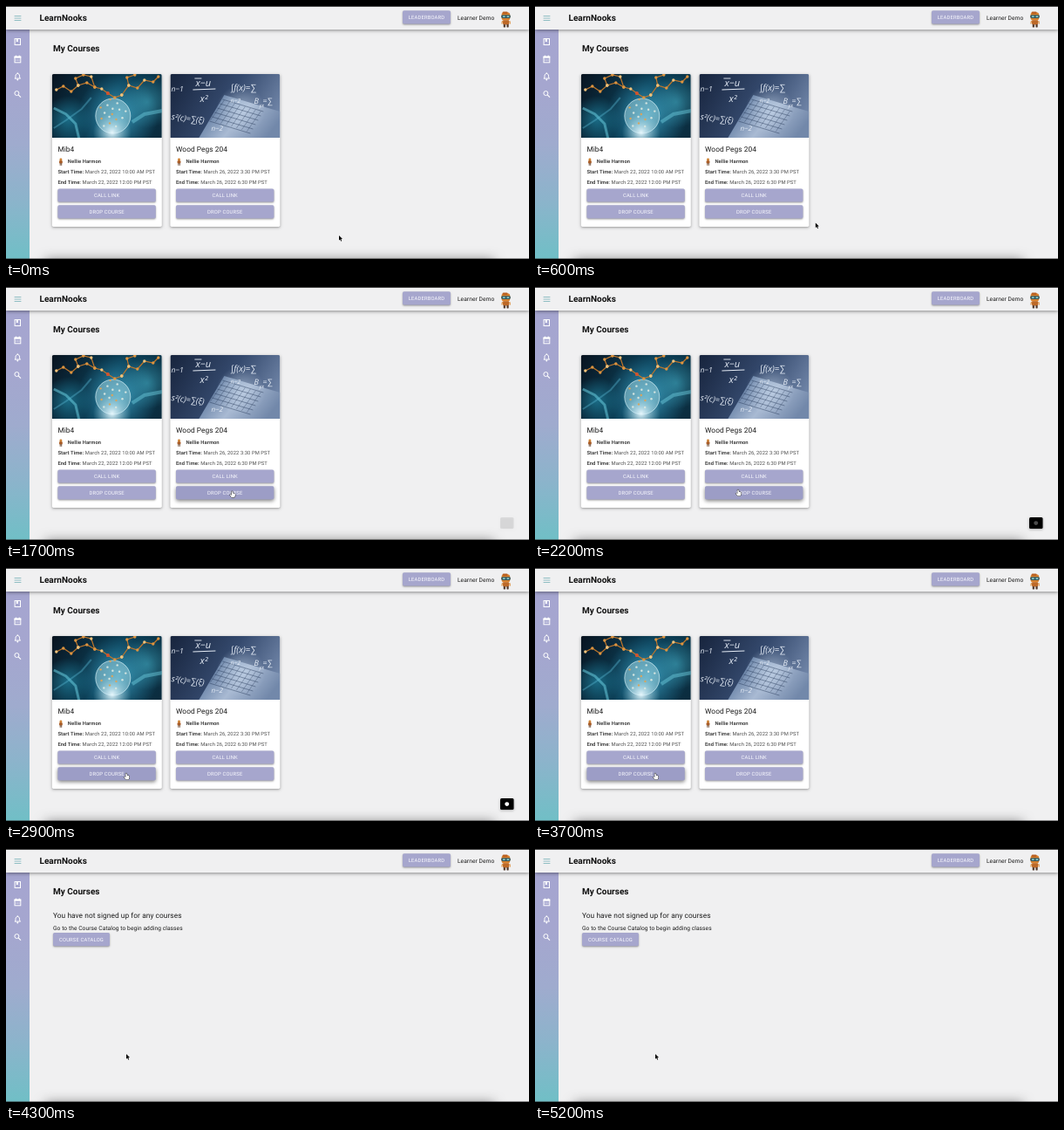
An HTML page with a canvas for the animation above (6800 ms loop, 600x290 px).

```html
<!DOCTYPE html>
<html lang="en">
<head>
<meta charset="utf-8">
<title>My Courses</title>
<style>
html, body { margin: 0; width: 100%; height: 100%; overflow: hidden; background: #f0f0f1; }
canvas { display: block; width: 600px; height: 290px; }
</style>
</head>
<body>
<canvas id="stage" width="600" height="290"></canvas>
<script>
const ctx = document.getElementById('stage').getContext('2d');
const LOOP = 6800;
const DROP_SECOND = 3800, DROP_FIRST = 4200;
const LILAC = '#a6a6cd';

const clamp = v => Math.max(0, Math.min(1, v));
const ease = v => { v = clamp(v); return v * v * (3 - 2 * v); };
const ramp = (t, from, to) => ease((t - from) / (to - from));

// time, x, y of the pointer tip
const track = [
  [200, 382, 263], [1000, 262, 234], [1600, 262, 234],
  [2150, 233, 232], [2350, 233, 232], [2800, 138, 235]
];

function pointerAt(t) {
  let a = track[0];
  for (const b of track) {
    if (t < b[0]) {
      const k = ramp(t, a[0], b[0]);
      return [a[1] + (b[1] - a[1]) * k, a[2] + (b[2] - a[2]) * k];
    }
    a = b;
  }
  return [a[1], a[2]];
}

// Time at which the pointer enters or leaves each drop button
function findCrossing(test) {
  let t = 0;
  while (t < 3000 && !test(...pointerAt(t))) t += 10;
  return t;
}
const enterSecond = findCrossing((x, y) => x < 308 && y > 228 && y < 243);
const leaveSecond = findCrossing(x => x < 195);
const enterFirst = findCrossing(x => x < 172);

function text(str, x, y, size, opt = {}) {
  ctx.font = `${opt.style || ''} ${opt.weight || 400} ${size}px ${opt.font || 'Roboto, sans-serif'}`;
  ctx.letterSpacing = (opt.gap || 0) * size + 'px';
  ctx.textRendering = 'geometricPrecision';
  ctx.textAlign = opt.align || 'left';
  ctx.fillStyle = opt.color || '#1c1c1c';
  ctx.fillText(str, x, y);
  const w = ctx.measureText(str).width;
  ctx.letterSpacing = '0px';
  return w;
}

function box(x, y, w, h, r, fill) {
  ctx.beginPath();
  ctx.roundRect(x, y, w, h, r);
  ctx.fillStyle = fill;
  ctx.fill();
}

function dot(x, y, r, fill) {
  ctx.beginPath();
  ctx.arc(x, y, r, 0, 7);
  ctx.fillStyle = fill;
  ctx.fill();
}

function line(points, color, width) {
  ctx.beginPath();
  points.forEach(([x, y]) => ctx.lineTo(x, y));
  ctx.strokeStyle = color;
  ctx.lineWidth = width;
  ctx.stroke();
}

function shadow(blur, dy, alpha, draw) {
  ctx.save();
  ctx.shadowColor = `rgba(0,0,0,${alpha})`;
  ctx.shadowBlur = blur;
  ctx.shadowOffsetY = dy;
  draw();
  ctx.restore();
}

function gradient(x0, y0, x1, y1, ...colors) {
  const g = ctx.createLinearGradient(x0, y0, x1, y1);
  colors.forEach((c, i) => g.addColorStop(i / (colors.length - 1), c));
  return g;
}

function glow(x, y, r, color, clear) {
  const g = ctx.createRadialGradient(x, y, 0, x, y, r);
  g.addColorStop(0, color);
  g.addColorStop(1, clear);
  ctx.fillStyle = g;
  ctx.fillRect(x - r, y - r, r * 2, r * 2);
}

function button(label, x, y, w, hover = 0) {
  shadow(2 + hover * 2.5, 1 + hover * 0.8, 0.38 + hover * 0.12, () =>
    box(x, y, w, 15.2, 1.7, hover ? `rgb(${166 - 10 * hover},${166 - 9 * hover},${205 - 7 * hover})` : LILAC));
  text(label, x + w / 2, y + 9.7, 5.83, { align: 'center', gap: 0.0286, color: '#fafaff' });
}

function sciencePhoto() {
  ctx.fillStyle = gradient(0, 0, 126, 73, '#08131f', '#0c4159', '#0b2b3d');
  ctx.fillRect(0, 0, 126, 73);
  glow(76, 46, 46, 'rgba(62,164,196,.95)', 'rgba(40,130,165,0)');
  glow(109, 32, 30, 'rgba(64,165,188,.6)', 'rgba(64,165,188,0)');
  glow(18, 52, 27, 'rgba(34,140,170,.65)', 'rgba(34,140,170,0)');
  line([[2, 39], [16, 46], [27, 57], [31, 74]], 'rgba(105,203,220,.55)', 3);
  line([[2, 62], [16, 53], [34, 40], [45, 27]], 'rgba(88,180,208,.4)', 2);
  line([[92, 55], [106, 46], [127, 42]], 'rgba(112,207,224,.45)', 4);
  dot(70, 48, 20, 'rgba(152,202,215,.55)');
  ctx.strokeStyle = 'rgba(210,238,245,.7)';
  ctx.lineWidth = 1;
  ctx.stroke();
  glow(69, 67, 22, 'rgba(235,250,255,.95)', 'rgba(150,210,230,0)');
  for (let i = 0; i < 16; i++) {
    const a = i * 2.4, r = 4.4 * Math.sqrt(i);
    dot(69 + r * Math.cos(a), 46 + r * Math.sin(a), 1.2, i % 3 ? '#d3e4df' : '#d6a55f');
  }
  const chains = [
    [[5, 18], [13, 14], [22, 20], [30, 13], [40, 10], [49, 15], [57, 17], [64, 22], [72, 27], [80, 24]],
    [[30, 13], [27, 5], [36, 1], [45, 3], [49, 15]],
    [[80, 24], [88, 13], [98, 16], [106, 7], [116, 9], [122, 3]],
    [[88, 13], [86, 4], [95, 1]]
  ];
  for (const c of chains) {
    line(c, '#bd752b', 1.2);
    c.forEach(([x, y], i) => dot(x, y, 1.7, i % 3 ? '#dc9440' : '#eec27c'));
  }
  dot(64, 22, 2, '#d4502c');
}

function mathPhoto() {
  ctx.fillStyle = gradient(0, 0, 126, 73, '#17243d', '#354a6e', '#8196b8');
  ctx.fillRect(0, 0, 126, 73);
  ctx.beginPath();
  [[62, 24], [126, 43], [126, 73], [33, 73]].forEach(p => ctx.lineTo(...p));
  ctx.fillStyle = gradient(50, 25, 110, 73, '#58749b', '#a9bad3', '#7288aa');
  ctx.fill();
  glow(81, 41, 28, 'rgba(195,212,232,.65)', 'rgba(195,212,232,0)');
  for (let i = 0; i < 6; i++) {
    line([[60 - i * 3, 29 + i * 5], [107 - i * 3, 43 + i * 5]], 'rgba(33,51,84,.55)', 0.8);
  }
  for (let i = 0; i < 8; i++) {
    line([[62 + i * 6, 30 + i * 1.8], [46 + i * 6, 53 + i * 1.8]], 'rgba(33,51,84,.4)', 0.8);
  }
  const ink = { font: '"Open Sans", sans-serif', style: 'italic', color: '#e6edf7' };
  text('n−1', 1, 20, 8.5, ink);
  text('x−u', 29, 14, 11, ink);
  line([[28, 5], [36, 5]], '#e6edf7', 0.9);
  line([[26, 18], [52, 17]], '#e6edf7', 1);
  text('x²', 34, 32, 11, ink);
  text('∫f(x)=∑', 69, 19, 10, ink);
  text('n−2', 69, 33, 7, ink);
  text('B  =∑', 96, 34, 9, ink);
  text('yx', 102, 38, 6, ink);
  ctx.save();
  ctx.translate(1, 52);
  ctx.rotate(0.12);
  text('s²(c)=∑(ξ)', 0, 0, 9.5, ink);
  ctx.restore();
  text('n−2', 47, 65, 8, ink);
}

function tutor(x, y) {
  box(x + 1.2, y, 2.8, 3.4, 1.2, '#cf8437');
  box(x + 0.7, y + 2.7, 3.8, 3.4, 1, '#a95d28');
  line([[x + 1.9, y + 5.5], [x + 1.9, y + 8.4]], '#6c4932', 0.9);
  line([[x + 3.4, y + 5.5], [x + 3.4, y + 8.4]], '#6c4932', 0.9);
}

function card(x, name, start, end, photo, hover, ripple) {
  shadow(3.2, 1.1, 0.38, () => box(x, 78, 126, 175, 1.7, '#fff'));
  ctx.save();
  ctx.beginPath();
  ctx.roundRect(x, 78, 126, 73, [1.7, 1.7, 0, 0]);
  ctx.clip();
  ctx.translate(x, 78);
  photo();
  ctx.restore();

  const left = x + 6.6;
  text(name, left, 167, 8.33, { gap: 0.0075 });
  tutor(x + 7.5, 174.5);
  const body = { gap: 0.0107, color: '#505050' }, bold = { ...body, weight: 700, color: '#444' };
  text('Nellie Harmon', x + 18, 180.4, 5.83, bold);
  [['Start Time:', start, 192], ['End Time:', end, 203.6]].forEach(([label, when, y]) => {
    const w = text(label, left, y, 5.83, bold);
    text(' ' + when, left + w, y, 5.83, body);
  });
  button('CALL LINK', left, 209.4, 112.4);
  button('DROP COURSE', left, 228.2, 112.4, hover);
  if (ripple) {
    ctx.save();
    ctx.beginPath();
    ctx.roundRect(left, 228.2, 112.4, 15.2, 1.7);
    ctx.clip();
    dot(ripple.x, 237, ripple.r, `rgba(255,255,255,${ripple.alpha})`);
    ctx.restore();
  }
}

function rippleAt(t, start, x) {
  const age = t - start;
  if (age < 0 || age > 650) return null;
  return { x, r: 4 + 60 * ease(age / 600), alpha: 0.25 * (1 - ramp(age, 200, 650)) };
}

function sideIcons() {
  ctx.strokeStyle = '#fff';
  ctx.lineWidth = 1;
  ctx.strokeRect(10.1, 37.5, 6.4, 7);
  box(11.8, 37.5, 2.2, 3.5, 0, '#fff');

  ctx.strokeRect(10, 58, 6.8, 6.8);
  box(9.6, 57.7, 7.6, 2, 0, '#fff');
  line([[11.5, 56.6], [11.5, 58]], '#fff', 1);
  line([[15.3, 56.6], [15.3, 58]], '#fff', 1);
  for (let i = 0; i < 3; i++) box(11.2 + i * 1.7, 61.5, 1, 1, 0, '#fff');

  ctx.beginPath();
  ctx.moveTo(10, 83.1);
  ctx.lineTo(11, 82);
  ctx.lineTo(11, 80.2);
  ctx.bezierCurveTo(11, 76.6, 15.6, 76.6, 15.6, 80.2);
  ctx.lineTo(15.6, 82);
  ctx.lineTo(16.6, 83.1);
  ctx.closePath();
  ctx.stroke();
  dot(13.3, 84.5, 0.9, '#fff');
  dot(13.3, 77, 0.7, '#fff');

  ctx.beginPath();
  ctx.arc(12.4, 100, 2.5, 0, 7);
  ctx.stroke();
  line([[14.2, 101.8], [17, 104.6]], '#fff', 1.2);
}

function avatar() {
  box(568.6, 7.2, 9.6, 9.4, 2.8, '#d7822f');
  box(569.6, 6.5, 6, 2.5, 1.2, '#b95f20');
  box(568.2, 10.2, 10.6, 3.8, 1.4, '#35565c');
  box(569.8, 11.2, 3, 1.7, 0.6, '#82c5c5');
  box(574.4, 11.2, 3, 1.7, 0.6, '#82c5c5');
  box(570, 16.3, 7.2, 5.2, 1.4, '#bd6928');
  line([[569.5, 17], [568.8, 20.5]], '#dd9444', 1.2);
  line([[577.8, 17], [578.4, 20.5]], '#dd9444', 1.2);
  box(570.7, 21, 2.3, 3.4, 0.6, '#594032');
  box(574.4, 21, 2.3, 3.4, 0.6, '#594032');
}

function frame() {
  ctx.fillStyle = '#f0f0f1';
  ctx.fillRect(0, 0, 600, 290);
  ctx.fillStyle = gradient(0, 27, 0, 290, '#a5a5d0', '#a5a6cf', '#9fabce', '#8bb4cb', '#70bfc6');
  ctx.fillRect(0, 27, 27, 263);
  shadow(4, 1.4, 0.45, () => box(0, 0, 600, 27, 0, '#f0f0f1'));
  ctx.fillStyle = '#303030';
  ctx.fillRect(0, 0, 600, 0.9);

  [11.5, 14, 16.5].forEach(y => line([[9.6, y], [17.4, y]], '#86b9bf', 0.9));
  text('LearnNooks', 38.5, 17.4, 10, { weight: 700, color: '#111' });
  button('LEADERBOARD', 455, 5.2, 55);
  text('Learner Demo', 560.3, 16.3, 6.67, { gap: 0.0094, align: 'right' });
  avatar();
  sideIcons();
  text('My Courses', 54, 52.4, 10, { weight: 700, color: '#111' });
}

function emptyState() {
  text('You have not signed up for any courses', 54, 79, 8.33, { gap: 0.0075 });
  text('Go to the Course Catalog to begin adding classes', 54, 93.2, 6.67, { gap: 0.0094 });
  button('COURSE CATALOG', 54, 96, 65);
}

function statusBadge(t) {
  const alpha = ramp(t, 1680, 1800) * (1 - ramp(t, 3250, 3400));
  if (!alpha) return;
  ctx.save();
  ctx.globalAlpha = alpha;
  shadow(3, 1, 0.3, () => box(567, 264, 15.5, 13, 1.5, '#000'));
  ctx.globalAlpha = alpha * (0.25 + 0.75 * ramp(t, 2100, 2800));
  dot(574.7, 270.6, 2.4, '#fff');
  ctx.restore();
}

function outline(points) {
  ctx.beginPath();
  points.forEach(p => ctx.lineTo(...p));
  ctx.closePath();
  ctx.lineJoin = 'round';
  ctx.stroke();
  ctx.fill();
}

function pointer(x, y, hand) {
  ctx.save();
  ctx.translate(x, y);
  ctx.lineWidth = 1;
  if (hand) {
    ctx.strokeStyle = '#222';
    ctx.fillStyle = '#fff';
    outline([[-0.7, 0.4], [0.6, 0.4], [0.9, 2.7], [3.3, 3.3], [3.5, 5.3], [2.6, 7.4], [-0.6, 7.4], [-2.6, 4.7], [-2, 4], [-0.6, 5]]);
  } else {
    ctx.strokeStyle = '#fff';
    ctx.fillStyle = '#000';
    outline([[0, 0], [0, 5.7], [1.3, 4.6], [2.3, 6.7], [3.2, 6.3], [2.3, 4.2], [4, 4.1]]);
  }
  ctx.restore();
}

function draw(t) {
  frame();
  const overSecond = ramp(t, enterSecond, enterSecond + 200) * (1 - ramp(t, leaveSecond, leaveSecond + 200));
  if (t < DROP_FIRST) {
    card(52.8, 'Mib4', 'March 22, 2022 10:00 AM PST', 'March 22, 2022 12:00 PM PST', sciencePhoto,
      ramp(t, enterFirst, enterFirst + 200), null);
  } else {
    emptyState();
  }
  if (t < DROP_SECOND) {
    card(188.4, 'Wood Pegs 204', 'March 26, 2022 3:30 PM PST', 'March 26, 2022 6:30 PM PST', mathPhoto,
      overSecond, rippleAt(t, 1080, 262));
  }

  shadow(14, 0, 0.5, () => box(45, 291, 515, 12, 3, '#555'));
  ctx.fillStyle = 'rgba(40,40,40,.75)';
  ctx.fillRect(0, 289.3, 600, 0.7);
  statusBadge(t);

  const [x, y] = pointerAt(t);
  const hand = t < DROP_FIRST && (t >= enterFirst || (t >= enterSecond && t < leaveSecond));
  pointer(x, y, hand);
}

const began = performance.now();
function tick(now) {
  draw(Math.max(0, now - began) % LOOP);
  requestAnimationFrame(tick);
}
draw(0);
requestAnimationFrame(tick);
</script>
</body>
</html>
```
